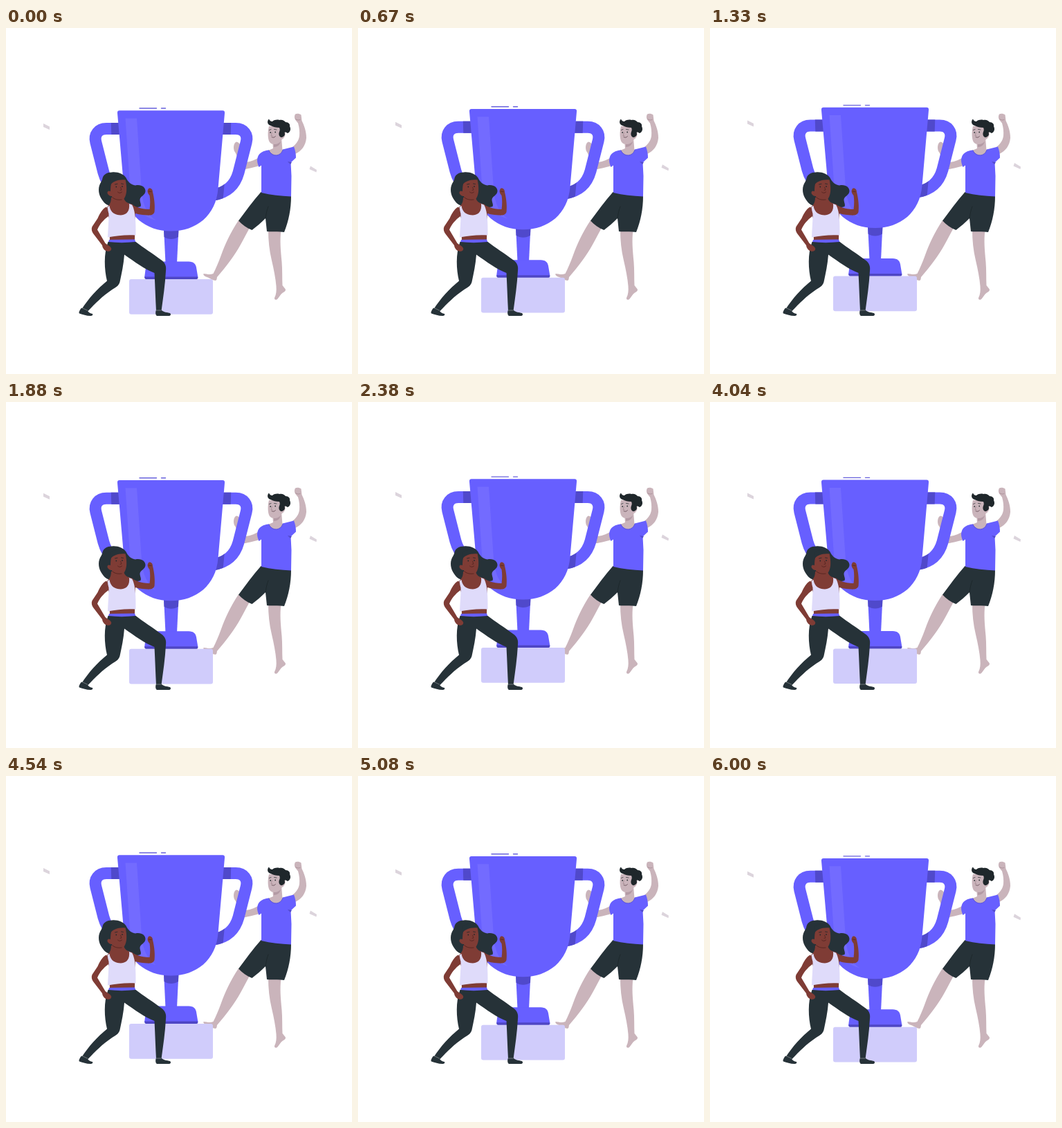
Write an HTML page with a canvas that moves like this. It is 500 px wide and 500 px high and loops after 6040 ms.

```html
<!DOCTYPE html>
<html lang="en">
<head>
<meta charset="utf-8">
<title>Trophy celebration</title>
<style>
  html, body { margin: 0; width: 100%; height: 100%; overflow: hidden; background: #fff; }
  canvas { display: block; width: 500px; height: 500px; }
</style>
</head>
<body>
<canvas id="stage"></canvas>
<script>
const LOOP = 6040;
const LIFT = 10;
const AXIS = 238.5;

const C = {
  purple: '#675fff', shade: '#5049cb', strip: '#4e46c4', shine: '#736bff',
  podium: '#d0ccfb', dark: '#263238', hair: '#1f272b',
  skin: '#cab4bb', skinLine: '#9f858d', brown: '#7f3c35', brownLine: '#4d211e',
  top: '#dfdbfa', paper: '#dcd4dc'
};

const canvas = document.getElementById('stage');
const ctx = canvas.getContext('2d');
const dpr = window.devicePixelRatio || 1;
canvas.width = canvas.height = 500 * dpr;

function fill(d, color) {
  ctx.fillStyle = color;
  ctx.fill(new Path2D(d));
}

function line(d, color, width, cap = 'round') {
  ctx.strokeStyle = color;
  ctx.lineWidth = width;
  ctx.lineCap = cap;
  ctx.lineJoin = 'round';
  ctx.stroke(new Path2D(d));
}

function dot(x, y, rx, ry, color) {
  ctx.fillStyle = color;
  ctx.beginPath();
  ctx.ellipse(x, y, rx, ry, 0, 0, Math.PI * 2);
  ctx.fill();
}

function shifted(dy, draw) {
  ctx.save();
  ctx.translate(0, dy);
  draw();
  ctx.restore();
}

function mirrored(draw) {
  draw();
  ctx.save();
  ctx.translate(2 * AXIS, 0);
  ctx.scale(-1, 1);
  draw();
  ctx.restore();
}

function confetti() {
  fill('M54 138 L63 142.5 L63 147 L54 143 Z', C.paper);
  fill('M440 199.5 L449 205 L448.5 208.5 L438.5 204 Z', C.paper);
}

function man() {
  // arms
  fill('M368 186 C361 190 354 193 347 194 C344 189 341 184 338.500 178 C341 172 338 165 333 164.5 C329 166 328 173 330 178 C333 181 336 193 340 202 C342 204.500 345 204.500 348 203.500 C355 202 361 201 368 198 Z', C.skin);
  fill('M418 182 C427 178 433 170 434 159 C434 149 430.500 140 427.500 134 L426.500 125.500 C424 123.500 420 123.500 418 124.500 C416.500 127 416.500 130 418 132.500 L422 137.500 C424 144 424.500 150 424 156 C423 163 419 168 413 173 Z', C.skin);
  line('M418.500 131.500 C420 133 423 133.500 425 132.500', C.skinLine, 0.7);

  // legs
  fill('M336 278 C325 295 317 311 311 328 C307 339 303 348 299.500 355 C295 357 290 355.500 285.500 355 C284.500 357.500 288 359.500 292 360.500 C296 362.500 299 365 303 365 C305 364 304.500 362 305 360 C318 345 331 328 339 313 C344 304 348 296 352 289 Z', C.skin);
  fill('M379 292 C379 307 380.500 321 384 336 C387 349 389.500 361 390.500 373 C391 380 390.500 385 388 390 C387.500 392.500 390 393.500 392 392 C395 389 396.500 385 400 382.500 C403 381 405 379 403.500 377 L399.500 372 C399 362 399.500 350 398.500 338 C397 321 395.500 308 397.500 292 Z', C.skin);

  // shorts
  fill('M368.500 237 C383 240 398 241 412 242.500 C412 262 408.500 279 402 295 C393 293.500 385 295 377 294 L375 275 C369 281 362 287 355.500 292 C348 289 341 284 336 278.500 C346 265 357 250 368.500 237 Z', C.dark);
  line('M375 275 C376 268 377 263 379 258', '#1b2428', 0.7);

  // neck and shirt
  fill('M385 162 L398 158 L399.500 177 C398 186 382 186 379 177 L386 174 Z', C.skin);
  fill('M380 176.500 C372 177 366 180.500 364 186 C362 191 363.500 196 365.500 201 L369 198.500 L369 238 C383 241.500 397 242.500 412 243.500 L412.500 214 L411.500 194.500 L419 187.500 C419 182 418 176 416 171.500 L400 175.500 C397 186.500 384 186 380 176.500 Z', C.purple);
  line('M380 177 C384 186.500 397 186.500 400 176', C.shade, 0.8);
  fill('M407 193 L413 194 L411 197 Z', C.shade);

  // head
  fill('M380 142 C378 150 378 160 381 165 C385 170 393 168 397 162 C402 160 405 155 403 149 L397 140 Z', C.skin);
  fill('M387 168 C391 168.500 394 167 397 164 C396 169 392 172 387 172 Z', '#b39aa4');
  fill('M380 131.500 C381 134 383 135.500 385 135 C388 132.500 392 132 395 133 C399 132 402 133.500 404 136 C408 136 411 139 410 142 C412 146 411 150 407 152 C405 150.500 403 150 402.500 151 C404 154 402 157.500 398 158 C395 157.500 393.500 154 395 150 C396 148 396 146 395 144 C390 144 386 143 382.500 141 C378 140 376.500 135 380 131.500 Z', C.hair);
  dot(382.2, 151, 0.8, 1.1, C.hair);
  dot(389.2, 150.5, 0.8, 1.1, C.hair);
  line('M380.500 147.500 L383 146.500 M387.500 146.500 L391 147', C.hair, 0.7);
  line('M384.500 151 L383 155.500 L385 155.500', C.skinLine, 0.7);
  line('M384 157.500 C386 158.800 388 158.300 389.500 156.500', '#5d444e', 0.8);
}

function handle() {
  const d = 'M310 145.500 L332 145.500 C343.500 145.500 350 154 347.200 165 L336 209 C331 227 319 238 300 241';
  line(d, C.purple, 17, 'butt');
  ctx.save();
  ctx.clip(new Path2D('M300 130 L325.500 130 L324.500 160 L300 160 Z M300 222 L316 222 L313 254 L300 254 Z'));
  line(d, C.shade, 17, 'butt');
  ctx.restore();
}

function trophy() {
  ctx.fillStyle = C.podium;
  ctx.beginPath();
  ctx.roundRect(178, 363, 121, 50.7, 3);
  ctx.fill();

  mirrored(handle);

  // stem and base
  fill('M228 288 L249.500 288 L247 340 L230.500 340 Z', C.purple);
  fill('M228 290 L249.500 290 L249 302 C243 306 234 306 228.500 302 Z', C.shade);
  fill('M213 337.500 L264 337.500 C271 337.500 274 341 275 346 L277.500 361 L200 361 L202 346 C203 341 206 337.500 213 337.500 Z', C.purple);
  fill('M200.300 359.500 L277.200 359.500 L277.200 361.500 Q277 363 275 363 L202.500 363 Q200 363 200.300 359.500 Z', C.strip);

  // bowl
  fill('M164 119.200 L313 119.200 Q316.500 119.200 316 123.200 L306.500 232 C303.500 271 275 293.500 238.500 293.500 C202 293.500 173.500 271 170.500 232 L161 123.200 Q160.500 119.200 164 119.200 Z', C.purple);
  fill('M172.500 130.500 L189 130.500 L196 235 C197.500 257 205 270 216.500 278 C194 271 181 256 179.500 235 Z', C.shine);
  line('M193 116 L217.500 116 M224.500 116 L230.500 116', '#6862dc', 1.4);
}

function woman() {
  // hair
  fill('M153 208.500 C161 207.500 170 211 173.500 216.500 C176 222 181 227 187 227.500 C195 225.500 202 230 201.500 236 C201 242 194 243 193.500 248 C193.500 252 196 255 194.500 258 C187 261 181 257 177 253 L152 257 C145 256.500 141 252 138 247 C134 241 132.500 232 136 225 C138 222 139 219.500 139.500 217 C141 211.500 146 208.500 153 208.500 Z', C.dark);

  // raised arm
  fill('M180 254 C187 258 194 262 207.500 262 C208.500 255 208.500 248 207.500 242 C204.500 239 203.500 235 206 232 C209 230.500 212 233 212 237 C214.500 247 215.500 258 214.500 266 C213 270.500 208 271 203 270.500 C195 270 188 269 183 266 Z', C.brown);
  line('M206 236 L210 236.500', C.brownLine, 0.7);

  // torso
  fill('M152 245 L170 244 C171 251 175 253 183 255 L187 263 L186 307 L150 308 L149 275 L143.500 261 C148 257 152 254 152 245 Z', C.brown);
  fill('M146.500 258.500 L149.500 257 C151 267 158 270.500 166 270.500 C175 270 179 264 178 254 L182 255.500 C186 262 188 275 187.500 299.500 C174 298.500 160 300 147 302.500 C147.500 291 148.500 278 148.500 271 Z', C.top);

  // face
  fill('M152 225 C151 230 151 234 151 236 C147 234 145 238 148 241 C150 243 152 243 153 243 L154 249 C160 252 167 250 171 246 C175 240 175 230 172.500 219 C166 217 156 219 152 225 Z', C.brown);
  fill('M151 227 C154 222 162 218.500 173 219.500 C172 213 160 211 152 217 Z', C.dark);
  line('M154 245 C158 248.500 163 248.500 167 248', C.brownLine, 0.8);
  dot(159.3, 229.5, 0.8, 1.1, C.hair);
  dot(168, 229, 0.8, 1.1, C.hair);
  line('M157.500 226 L161 225.300 M166.500 225 L169.500 225.500', C.hair, 0.8);
  line('M165.500 230 L167 234 L165 234.500', C.brownLine, 0.7);
  line('M161.500 237 C163 238.800 165.500 238.800 167.500 237', C.brownLine, 0.8);

  // legs
  fill('M149 306 L186 305.500 L188 311 L147.500 311 Z', C.purple);
  fill('M147.500 309 C160 310.500 174 310.500 187.500 309 C199 318 211 325 224 335 C230 339 232 344 231 351 C230 371 227 390 224.500 409 L217 409 C216 391 215.500 374 214.500 354 C201 349 186 338 171 327.500 C170 342 167 355 164.500 367 C163 373 158 375 152 379 C140 387 129 398 118.500 409 L109 407 C119 391 132 377 146 365.500 C142 349 141 326 147.500 309 Z', C.dark);
  fill('M109 404.500 L117.500 408 C119 411 122 412.500 125 413 C126 415 124.500 416 122 416 C116 416 111 414 106 412.500 C104.500 411 107 407 109 404.500 Z', C.dark);
  fill('M217 407.500 L224.500 407.500 C228 411 233 411 237 412 C239 414 238 416 235 416 L218 416 C215.500 414 216 410 217 407.500 Z', C.dark);
  line('M110.500 404.800 L117.500 408 M217.500 408 L224 408', '#8d9497', 0.7);

  // arm with the hand on the hip
  fill('M144.500 258.500 C139 262 135.500 268 132.500 275 L124.500 287 C123 290.500 124 294 126 297 L139 314 C139.500 318 142 322 147 322.800 C150.500 323 153 321 152 318 C150 314.500 146.500 313.500 143.500 311 L132 291.500 C135 284 141 277 148 272 L148.500 268 Z', C.brown);
}

function draw(now) {
  const p = (now % LOOP) / LOOP;
  const dy = -LIFT * (1 - Math.abs(1 - 2 * p));
  ctx.setTransform(dpr, 0, 0, dpr, 0, 0);
  ctx.fillStyle = '#fff';
  ctx.fillRect(0, 0, 500, 500);
  man();
  shifted(dy, confetti);
  shifted(dy, trophy);
  woman();
}

const start = performance.now();
function tick() {
  draw(performance.now() - start);
  requestAnimationFrame(tick);
}
tick();
</script>
</body>
</html>
```
